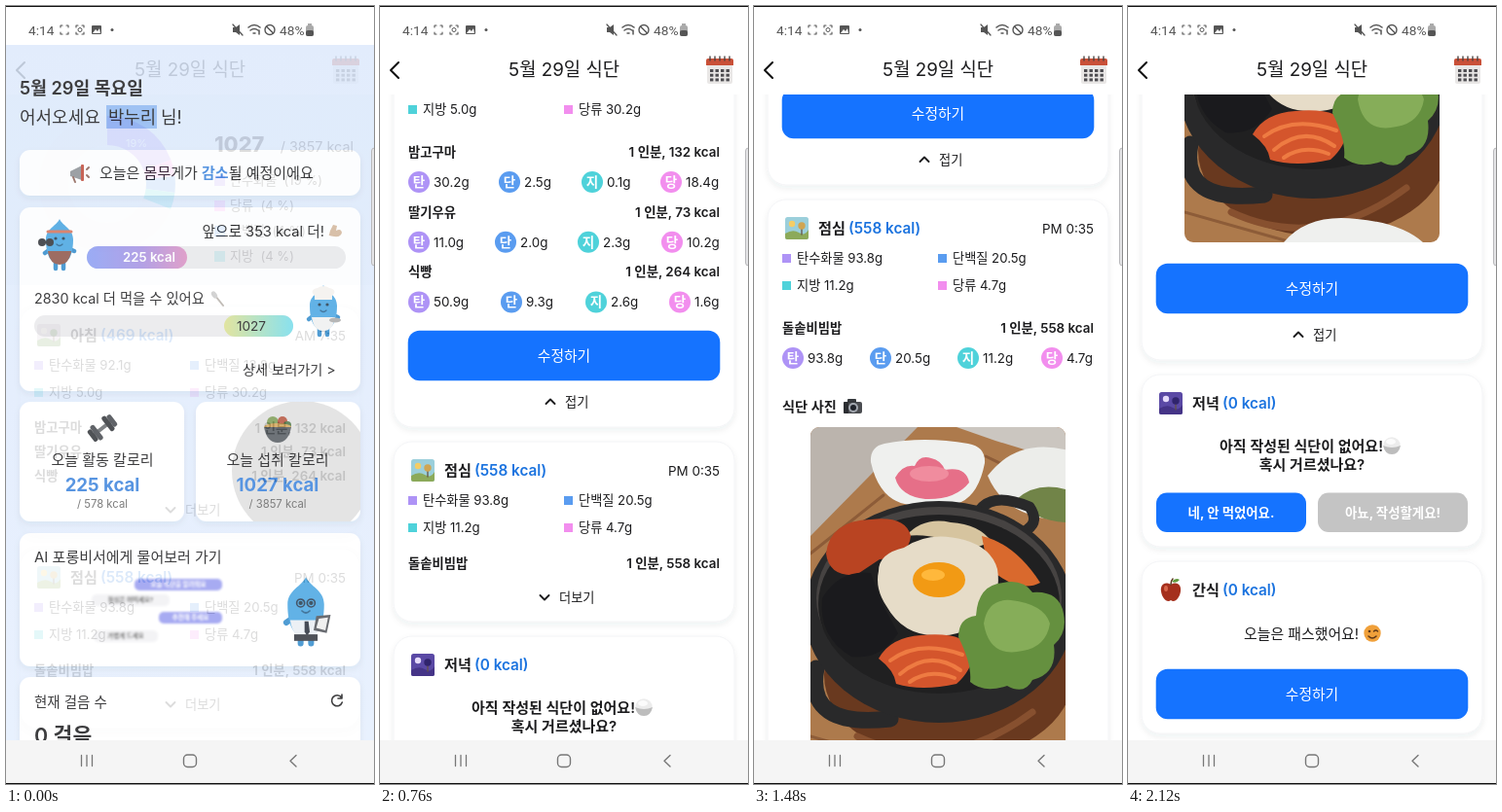
Write an HTML page that moves like this. It is 378 px wide and 800 px high and loops after 2.16 s.

```html
<!DOCTYPE html>
<html lang="ko">
<head>
<meta charset="utf-8">
<style>
html, body { margin: 0; width: 100%; height: 100%; overflow: hidden; background: #fff; }
svg { display: block; width: 378px; height: 800px; }
text { font-family: Inter, "Noto Sans CJK KR", "Noto Sans CJK", sans-serif; white-space: pre; }
.system { font-family: Roboto, sans-serif; }
</style>
</head>
<body>
<svg id="stage" viewBox="0 0 378 800"></svg>
<script>
const LOOP = 2160, STEP = 40;
const INK = '#1c1c1e', BLUE = '#1573ff', KCAL = '#1b73df';
const PURPLE = '#ae93f6', PINK = '#f28eee', SKY = '#5a9cf0', CYAN = '#4fd2da';

// Shape helpers; text is placed by its vertical centre.
const attrs = o => Object.entries(o).map(([k, v]) => ` ${k}="${v}"`).join('');
const group = (body, o = {}) => `<g${attrs(o)}>${body}</g>`;
const at = (x, y, body) => group(body, { transform: `translate(${x} ${y})` });
const rect = (x, y, w, h, fill, r = 0, o = {}) =>
  `<rect${attrs({ x, y, width: w, height: h, rx: r, fill, ...o })}/>`;
const oval = (cx, cy, rx, ry, fill, o = {}) => `<ellipse${attrs({ cx, cy, rx, ry, fill, ...o })}/>`;
const dot = (x, y, r, fill, o) => oval(x, y, r, r, fill, o);
const path = (d, fill, o = {}) => `<path${attrs({ d, fill, ...o })}/>`;
const line = (d, color, width = 2) =>
  path(d, 'none', { stroke: color, 'stroke-width': width, 'stroke-linecap': 'round', 'stroke-linejoin': 'round' });
const text = (x, y, str, size, o = {}) =>
  `<text${attrs({ x, y: (y + size * 0.375).toFixed(2), 'font-size': size, fill: INK, ...o })}>${str}</text>`;
const MID = { 'text-anchor': 'middle' }, END = { 'text-anchor': 'end' };
const BOLD = { 'font-weight': 700 }, SEMI = { 'font-weight': 600 };

const defs = `<defs>
  <filter id="shadow" x="-10%" y="-10%" width="120%" height="125%">
    <feDropShadow dx="0" dy="3" stdDeviation="3" flood-color="#203050" flood-opacity=".07"/></filter>
  <filter id="soft"><feGaussianBlur stdDeviation="1"/></filter>
  <clipPath id="page"><rect y="91" width="378" height="664"/></clipPath>
  <clipPath id="tile"><rect x="195" y="407" width="169" height="123" rx="11"/></clipPath>
  <clipPath id="photo"><rect width="262" height="349" rx="9"/></clipPath>
  <linearGradient id="sky" x2="0" y2="1"><stop stop-color="#dde9fc"/><stop offset="1" stop-color="#e5effe"/></linearGradient>
  <linearGradient id="burn"><stop stop-color="#8b9ff5"/><stop offset=".55" stop-color="#a892e2"/><stop offset="1" stop-color="#dd91c2"/></linearGradient>
  <linearGradient id="eat"><stop stop-color="#dde08f"/><stop offset="1" stop-color="#74dcec"/></linearGradient>
</defs>`;

const chevron = (x, y, dir) => line(`M${x - 4.5} ${y - 2 * dir}l4.5 ${4.5 * dir}l4.5 ${-4.5 * dir}`, INK, 1.9);
const toggle = (y, open) => open
  ? chevron(175, y, -1) + text(190, y, '접기', 13.2)
  : chevron(169, y, 1) + text(184, y, '더보기', 13.2);
const editButton = y => rect(28.7, y - 0.2, 320.6, 51.4, BLUE, 12) +
  text(189, y + 25.5, '수정하기', 14.8, { ...MID, fill: '#fff' });
const panel = h => rect(14, 0, 350, h, '#fff', 19, { stroke: '#f3f4f6', filter: 'url(#shadow)' });

const scene = (sky, sun, hill, tree) => rect(32, 18, 24, 23, sky, 2.5) + dot(39, 25, 3.2, sun) +
  path('M32 35q8 -5 14 -1t10 -3v8q0 2 -2 2h-20q-2 0 -2 -2z', hill) + line('M49 28v8', '#655445', 1.3) + dot(49, 27, 3.7, tree);
const apple = path('M44 24c-7 -4 -11 1 -10 7c1 7 6 12 10 9c4 3 9 -2 10 -9c1 -6 -3 -11 -10 -7z', '#a5301d') +
  line('M44 24q0 -4 2 -6', '#5c3a20', 1.6) + path('M45 21q4 -5 8 -2q-3 4 -8 2z', '#5f9a3c') + oval(39, 28, 2, 3, '#d8664b');
const heading = (icon, name, kcal, time = '') => icon + text(66, 29.5, name, 15.2, SEMI) +
  text(97, 29.5, `(${kcal} kcal)`, 15.3, { ...SEMI, fill: KCAL }) + text(349, 29.5, time, 13.4, END);

const nutrients = list => list.map((label, i) => {
  const x = i % 2 ? 189 : 29, y = i < 2 ? 60.5 : 88.5;
  return rect(x, y - 4.5, 9, 9, [PURPLE, SKY, CYAN, PINK][i]) + text(x + 15, y, label, 13.2);
}).join('');

const food = (y, name, amount) => text(29, y, name, 13.3, SEMI) +
  text(349, y, `1 인분, ${amount} kcal`, 13.4, { ...END, ...SEMI });
const badges = (y, grams, xs) => grams.map((g, i) => {
  const x = [40, ...xs][i];
  return dot(x, y, 11, [PURPLE, SKY, CYAN, PINK][i]) +
    text(x, y, '탄단지당'[i], 13.5, { ...MID, ...BOLD, fill: '#fff' }) + text(x + 15, y, g + 'g', 13.4);
}).join('');

function bibimbap() {
  const pan = '#29292a';
  return group(
    rect(0, 0, 262, 349, '#ad7a4c') + path('M0 0H110L0 112z', '#bbb4ad') + path('M150 0H262V36L190 14z', '#cbc6c0') +
    line('M0 130L75 70M180 30L262 70M0 318L110 349', '#8d5c38', 3) +
    oval(142, 255, 128, 88, '#69391f') + line('M48 318q90 42 180 -25', '#87502f', 7) +
    path('M62 36q-1 -16 14 -19q40 -8 86 0q18 3 17 20q-8 41 -36 43h-42q-30 -4 -39 -44z', '#eff0ee') +
    path('M87 52q8 -14 20 -12q5 -12 17 -8q10 2 14 12q22 -4 25 13q-14 18 -45 17q-26 -3 -31 -22z', '#e66f88') +
    oval(122, 48, 20, 8, '#f08c9e') +
    path('M182 50q32 -42 90 -24v70q-70 2 -90 -46z', '#ecedea') + path('M212 74q20 -18 50 -10v34q-34 -2 -50 -24z', '#718448') +
    line('M175 84q14 -17 50 -2q10 15 -2 23', pan, 11) + line('M6 248q-12 62 76 52', pan, 17) +
    oval(132, 190, 138, 114, pan) + oval(132, 176, 126, 94, '#464342') + oval(132, 182, 124, 92, '#202021') +
    path('M98 112q18 -20 46 -14q30 2 42 20l-22 8q-36 -18 -66 -14z', '#d6c49f') +
    path('M16 130q4 -34 46 -35q36 -4 41 17q-2 22 -32 24l-24 16q-28 2 -31 -22z', '#b94422') +
    path('M12 176q18 -30 50 -26l12 32l16 30q-18 28 -48 24q-34 -20 -30 -60z', '#1a1a1d') +
    path('M176 112q34 8 60 48q-22 12 -54 -16z', '#d9692d') +
    path('M70 148q0 -18 26 -24q26 -18 62 -8q28 8 34 30q4 24 -10 40q-18 30 -50 28q-36 2 -54 -30q-12 -18 -8 -36z', '#e6dcc8') +
    path('M70 238q12 -22 44 -24q44 -4 54 16q-2 20 -18 34q-36 8 -62 0q-2 -14 -18 -26z', '#d4552c') +
    line('M82 240q30 -22 74 -6M92 254q30 -26 62 -4M102 262q20 -14 46 -4', '#ee7b42', 4) +
    path('M152 216q0 -20 18 -22q2 -32 28 -34q20 -4 30 10q28 -2 32 22q4 20 -10 32q4 30 -22 36q-8 16 -26 6q-24 8 -38 -4q2 -18 -12 -46z', '#65903f') +
    path('M178 202q4 -26 28 -24q34 4 40 24q-4 24 -28 28q-34 8 -40 -28z', '#86ad59') +
    oval(132, 157, 27, 18, '#f29a14') + oval(126, 152, 12, 6, '#ffb83c') +
    path('M102 349q25 -30 75 -24q45 4 68 24z', '#eff0ee'), { 'clip-path': 'url(#photo)' });
}

const camera = rect(92, 208, 19, 12, '#4a4c50', 2) + rect(96, 205, 9, 4, '#35383c', 1) + rect(92, 208, 5, 12, '#2b2d31', 1) +
  dot(102, 214, 5, '#a3a8b0') + dot(102, 214, 3, '#20242b');
const bowl = at(271, 73, dot(0, 0, 8.7, '#ececec') + path('M-9 0Q0 4 9 0Q7 9 0 9T-9 0z', '#bdbdbd') + oval(-1, -4, 5, 3, '#fbfbfb'));
const wink = at(251, 74, dot(0, 0, 8.7, '#f0a03a') + dot(-3, -2, 1.3, '#5d3718') + line('M1.5 -2q2 -2 4 0M-4 3q4 4 8 0', '#5d3718', 1.4));

const breakfastRows = nutrients(['탄수화물 92.1g', '단백질 13.8g', '지방 5.0g', '당류 30.2g']);
const lunchRows = nutrients(['탄수화물 93.8g', '단백질 20.5g', '지방 11.2g', '당류 4.7g']);
const breakfastHead = heading(scene('#cfc3cc', '#f4eddc', '#6b9a4c', '#58823f'), '아침', 469, 'AM 7:35') + breakfastRows;
const lunchHead = heading(scene('#9bcfdb', '#f5cd65', '#8caa5a', '#d0a552'), '점심', 558, 'PM 0:35') + lunchRows;
const foods = [
  ['밤고구마', 132, ['30.2', '2.5', '0.1', '18.4'], [133, 218, 299]],
  ['딸기우유', 73, ['11.0', '2.0', '2.3', '10.2'], [129, 214, 300]],
  ['식빵', 264, ['50.9', '9.3', '2.6', '1.6'], [135, 222, 308]]
];

const breakfastShut = panel(234) + breakfastHead +
  foods.map(([n, k], i) => food(124.5 + i * 24.7, n, k)).join('') + toggle(209, false);
const breakfastOpen = panel(415) + breakfastHead +
  foods.map(([n, k, g, xs], i) => food(132 + i * 61.7, n, k) + badges(163 + i * 61.7, g, xs)).join('') +
  editButton(316) + rect(63, 378, 273, 22, '#e8e8e8', 0, { id: 'press' }) + toggle(389, true);
const lunchShut = panel(185) + lunchHead + food(125, '돌솥비빔밥', 558) + toggle(160, false);
const lunchOpen = panel(704) + lunchHead + food(132, '돌솥비빔밥', 558) +
  badges(163, ['93.8', '20.5', '11.2', '4.7'], [130, 220, 306]) +
  text(29, 213, '식단 사진', 14.2, SEMI) + camera + at(58, 234, bibimbap()) + editButton(605) + toggle(678, true);
const choice = (x, fill, label) => rect(x, 121.5, 154, 40.5, fill, 11) +
  text(x + 77, 142, label, 13.4, { ...MID, ...BOLD, fill: '#fff' });
const dinner = panel(177) + heading(scene('#5a49a5', '#e4dafa', '#453487', '#30246d'), '저녁', 0) +
  text(94, 73, '아직 작성된 식단이 없어요!', 15, SEMI) + bowl + text(189, 92, '혹시 거르셨나요?', 15, { ...MID, ...SEMI }) +
  choice(29, BLUE, '네, 안 먹었어요.') + choice(195, '#c4c4c4', '아뇨, 작성할게요!');
const snack = panel(177) + heading(apple, '간식', 0) + text(119, 74, '오늘은 패스했어요!', 14.9) + wink + editButton(111);

function donut() {
  const point = (deg, r) => {
    const a = (deg - 90) * Math.PI / 180;
    return `${104 + r * Math.cos(a)} ${183 + r * Math.sin(a)}`;
  };
  const slice = (from, to, fill) => path(
    `M${point(from, 70)}A70 70 0 0 1 ${point(to, 70)}L${point(to, 40)}A40 40 0 0 0 ${point(from, 40)}z`, fill);
  return dot(104, 183, 55, 'none', { stroke: '#f1f1f2', 'stroke-width': 30 }) +
    slice(0, 69, PURPLE) + slice(69, 83.3, PINK) + slice(83.3, 97.3, SKY) + slice(97.3, 111.5, CYAN) +
    text(134, 141, '19%', 11, { ...MID, fill: '#fff' });
}
const legend = [['탄수화물', 19, PURPLE], ['당류', 4, PINK], ['단백질', 4, SKY], ['지방', 4, CYAN]]
  .map(([n, p, c], i) => rect(214, 174 + i * 26, 11, 11, c) + text(230, 179.5 + i * 26, `${n}  (${p} %)`, 13.1)).join('');
const summary = rect(0, 91, 378, 196, '#f1f8f9') + donut() +
  text(214, 142, '1027', 21.8, { 'font-weight': 800 }) + text(357, 145, '/ 3857 kcal', 14.4, END) + legend;

const calendar = rect(336, 55, 26, 25, '#e9e7e6', 2) + path('M335 61V56q0 -2 2 -2h24q2 0 2 2v5z', '#c95038') +
  [0, 1, 2, 3, 4].map(i => line(`M${339 + i * 5} 52v4`, '#4b4342', 1.4)).join('') +
  Array.from({ length: 12 }, (_, i) => rect(339 + i % 4 * 5.5, 65 + Math.floor(i / 4) * 4.7, 3.4, 3, '#4d4c50')).join('');
const header = rect(0, 40, 378, 51, '#fff') + line('M19 58l-8 8l8 8', '#111', 2) +
  text(189, 65, '5월 29일 식단', 18.8, MID) + calendar;

const named = (id, body) => group(body, { id });
const diet = rect(0, 40, 378, 715, '#fff') + group(
  named('scroll', summary + at(0, 309, named('breakfastShut', breakfastShut) + named('breakfastOpen', breakfastOpen)) +
    named('lunch', named('lunchShut', lunchShut) + named('lunchOpen', lunchOpen)) +
    named('dinner', dinner) + named('snack', snack)),
  { 'clip-path': 'url(#page)' }) + header;

// Home screen
const tile = (x, y, w, h) => rect(x, y, w, h, '#fff', 11, { filter: 'url(#shadow)' });
const drop = (clothes, extra) => line('M-8 4l-7 5M8 4l7 3M-4 18v7M4 18v7', '#318bcc', 4.5) +
  path('M0 -26C3 -19 14 -16 14 -5C14 10 10 20 0 20S-14 10 -14 -5C-14 -16 -3 -19 0 -26z', '#46a5e2') +
  path('M-12 7H12Q10 21 0 21T-12 7z', clothes) + dot(-4, -6, 1.6, '#20394d') + dot(4, -6, 1.6, '#20394d') +
  line('M-3 0q3 3 6 0', '#245f8c', 1.3) + extra;
const athlete = at(55, 245, drop('#8e5447', line('M-12 -13h24', '#d77159', 3) + line('M-18 -2h8', '#303238', 2) +
  dot(-18, -2, 4, '#303238') + dot(-10, -2, 4, '#303238')));
const chef = at(326, 313, drop('#eff0f0', path('M-9 -11v-4q-6 -6 3 -8q6 -4 12 0q9 2 3 8v4z', '#f4f1ee') + oval(12, 10, 6, 2.5, '#aaa')));
const clerk = group(drop('#e9eef4', path('M-1 8h3l1 8l-2 3l-2 -3z', '#252d39') + rect(-9, 18, 18, 5, '#30343c') +
  line('M-7 -6a3 3 0 1 1 6 0a3 3 0 1 1 -6 0M1 -6a3 3 0 1 1 6 0a3 3 0 1 1 -6 0', '#26384e', 1.2) +
  path('M8 4l11 -1l-3 14l-10 -2z', '#4f5258') + path('M10 6l7 -1l-2 10l-7 -2z', '#eee')),
  { transform: 'translate(308 622) scale(1.34)' });
const megaphone = path('M66 170l12 -6v15l-12 -4z', '#8e9296') + rect(77, 163, 3, 17, '#c14b3b', 1) + line('M69 176l2 5M83 168l2 -2M83 174l2 2', '#8e6257', 2);
const muscle = path('M333 231l3 -6l4 1l-1 5q5 -3 6 2q-1 5 -8 4t-5 -2z', '#d4b69b');
const dumbbell = group(line('M-9 0H9', '#686c70', 4) + rect(-15, -7, 5, 14, '#303338', 2) + rect(-10, -9, 5, 18, '#44484d', 2) +
  rect(5, -9, 5, 18, '#303338', 2) + rect(10, -7, 5, 14, '#44484d', 2), { transform: 'translate(99 434) rotate(-38)' });
const salad = at(279, 435, dot(-5, -7, 6, '#7d9c55') + dot(5, -8, 5, '#b5533d') + dot(10, -4, 4, '#4d7645') +
  oval(0, -2, 14, 4, '#d3a75c') + path('M-14 -2H14Q11 14 0 14T-14 -2z', '#555b60'));
const calories = (x, label, eaten, goal) => text(x, 466, label, 15, MID) +
  text(x, 492, eaten + ' kcal', 18.6, { ...MID, ...BOLD, fill: '#3a82dc' }) + text(x, 512, `/ ${goal} kcal`, 11.3, { ...MID, fill: '#666' });
const bubble = (x, y, w, str, mine) => rect(x, y, w, 12, mine ? '#989cf0' : '#f2f2f4', 5) +
  text(x + w / 2, y + 6, str, 6.5, { ...MID, ...BOLD, fill: mine ? '#fff' : '#555' });

const home = rect(0, 40, 378, 715, 'url(#sky)') +
  text(14, 84, '5월 29일 목요일', 18.2, SEMI) + rect(103, 102, 52, 24, '#91b9f2') +
  text(14, 114, '어서오세요', 18) + text(105, 114, '박누리', 17.8) + text(159, 114, '님!', 18) +
  tile(14, 148, 350, 47) + megaphone +
  text(96, 171.5, '오늘은 몸무게가 <tspan fill="#3a82dc" font-weight="700">감소</tspan>될 예정이에요', 15) +
  tile(14, 207, 350, 189) + text(327, 231, '앞으로 353 kcal 더!', 14.7, END) + muscle + athlete +
  rect(83, 247, 266, 23, '#e9e9ec', 11.5) + rect(83, 247, 103, 23, 'url(#burn)', 11.5) +
  text(147, 258.5, '225 kcal', 13.2, { ...MID, ...SEMI, fill: '#fff' }) +
  text(29, 301, '2830 kcal 더 먹을 수 있어요', 14.3) + line('M215 298l8 10', '#b7b1ab', 2) + oval(214, 297, 2.5, 4, '#ccc', { transform: 'rotate(-35 214 297)' }) +
  rect(29, 318, 266, 22, '#e9e9ec', 11) + rect(224, 318, 71, 22, 'url(#eat)', 11) + text(252, 329, '1027', 13.6, MID) + chef +
  text(243, 374, '상세 보러가기 &gt;', 14.2) +
  tile(14, 407, 169, 123) + tile(195, 407, 169, 123) +
  group(dot(304, 478, 72, '#000', { opacity: 0.12 }), { 'clip-path': 'url(#tile)' }) + dumbbell + salad +
  calories(99, '오늘 활동 칼로리', 225, 578) + calories(279, '오늘 섭취 칼로리', 1027, 3857) +
  tile(14, 542, 350, 137) + text(29, 566, 'AI 포롱비서에게 물어보러 가기', 15) +
  group(bubble(132, 589, 90, '오늘 식단을 알려줘요', true) + bubble(88, 605, 80, '점심은 어떠세요?', false) +
    bubble(157, 623, 65, '추천해 주세요', true) + bubble(90, 642, 66, '가볍게 드세요', false), { filter: 'url(#soft)' }) + clerk +
  tile(14, 690, 350, 90) + text(29, 716, '현재 걸음 수', 14.5) + text(29, 750, '0 걸음', 21.5, SEMI) +
  line('M344.5 711a5.5 5.5 0 1 0 .8 5M345 708v4h-4', INK, 1.6);

// System bars
const GREY = '#555', SYSTEM = { class: 'system', fill: GREY };
const capture = x => line(`M${x - 4} 22v-2h2M${x + 2} 20h2v2M${x + 4} 27v2h-2M${x - 2} 29h-2v-2`, GREY, 1.1);
const status = rect(0, 0, 378, 40, '#fff') + text(23, 24.5, '4:14', 13.7, SYSTEM) +
  capture(60) + capture(76) + dot(76, 24.5, 2, 'none', { stroke: GREY }) +
  rect(88, 20, 10, 9, GREY, 1) + path('M89 28l3 -4l2 2l2 -3l1 5z', '#fff') + dot(109, 24.5, 1.5, GREY) +
  path('M233 22h3l4 -3v11l-4 -3h-3z', GREY) + line('M233 19l10 11', GREY, 1.3) +
  line('M249 22q6 -5 12 0M251 25q4 -3 8 0M254 28h2M260 25v4', GREY, 1.5) +
  dot(271, 24.5, 5, 'none', { stroke: GREY, 'stroke-width': 1.4 }) + line('M267.5 21l7 7', GREY, 1.4) +
  text(281, 24.5, '48%', 13.7, SYSTEM) + rect(308, 20, 8, 11, '#aaa', 2) + rect(310, 18, 4, 3, '#aaa') + rect(308, 25, 8, 6, GREY, 2);
const nav = rect(0, 755, 378, 45, '#f5f5f5') + line('M77.5 770.5v11M83 770.5v11M88.5 770.5v11', '#777', 1.3) +
  rect(182.5, 770, 13, 12.5, 'none', 4, { stroke: '#777', 'stroke-width': 1.4 }) + line('M298 770.5l-6 5.7l6 5.7', '#777', 1.4);
const edge = rect(375.5, 146, 6, 121, '#e5e5e7', 3, { stroke: '#b9b9bc' }) + rect(0, 0, 378, 1, '#111') + rect(0, 799, 378, 1, '#111');

document.getElementById('stage').innerHTML = defs + home + named('diet', diet) + status + nav + edge;
const el = id => document.getElementById(id);
const show = (id, on) => el(id).setAttribute('display', on ? 'inline' : 'none');
const move = (id, y) => el(id).setAttribute('transform', `translate(0 ${y.toFixed(2)})`);

// Monotone cubic through [time, scroll] stops
const stops = [[480, 0], [760, 291], [1000, 392], [1220, 392], [1480, 540], [1680, 813], [2120, 1079]];
const rate = i => (stops[i + 1][1] - stops[i][1]) / (stops[i + 1][0] - stops[i][0]);
const slopes = stops.map((_, i) => {
  if (i === 0 || i === stops.length - 1) return 0;
  const a = rate(i - 1), b = rate(i);
  return a * b > 0 ? 2 * a * b / (a + b) : 0;
});
function scrollAt(t) {
  if (t <= stops[0][0]) return 0;
  const i = stops.findIndex((s, k) => k < stops.length - 1 && t < stops[k + 1][0]);
  if (i < 0) return stops[stops.length - 1][1];
  const [t0, y0] = stops[i], [t1, y1] = stops[i + 1], d = t1 - t0, u = (t - t0) / d;
  const ease = u * u * (3 - 2 * u);
  return y0 + (y1 - y0) * ease + d * u * (1 - u) * (slopes[i] * (1 - u) - slopes[i + 1] * u);
}

function draw(t) {
  const breakfast = t >= 360, lunch = t >= 1200;
  el('diet').setAttribute('opacity', Math.min(1, 0.15 + t / 80));
  show('breakfastShut', !breakfast);
  show('breakfastOpen', breakfast);
  show('press', t < 480);
  show('lunchShut', !lunch);
  show('lunchOpen', lunch);
  const lunchY = breakfast ? 739 : 558, dinnerY = lunchY + (lunch ? 719 : 200);
  move('lunch', lunchY);
  move('dinner', dinnerY);
  move('snack', dinnerY + 192);
  move('scroll', -scrollAt(t));
}

const start = performance.now();
function tick() {
  const t = (performance.now() - start) % LOOP;
  draw(Math.floor(t / STEP) * STEP);
  requestAnimationFrame(tick);
}
tick();
</script>
</body>
</html>
```
